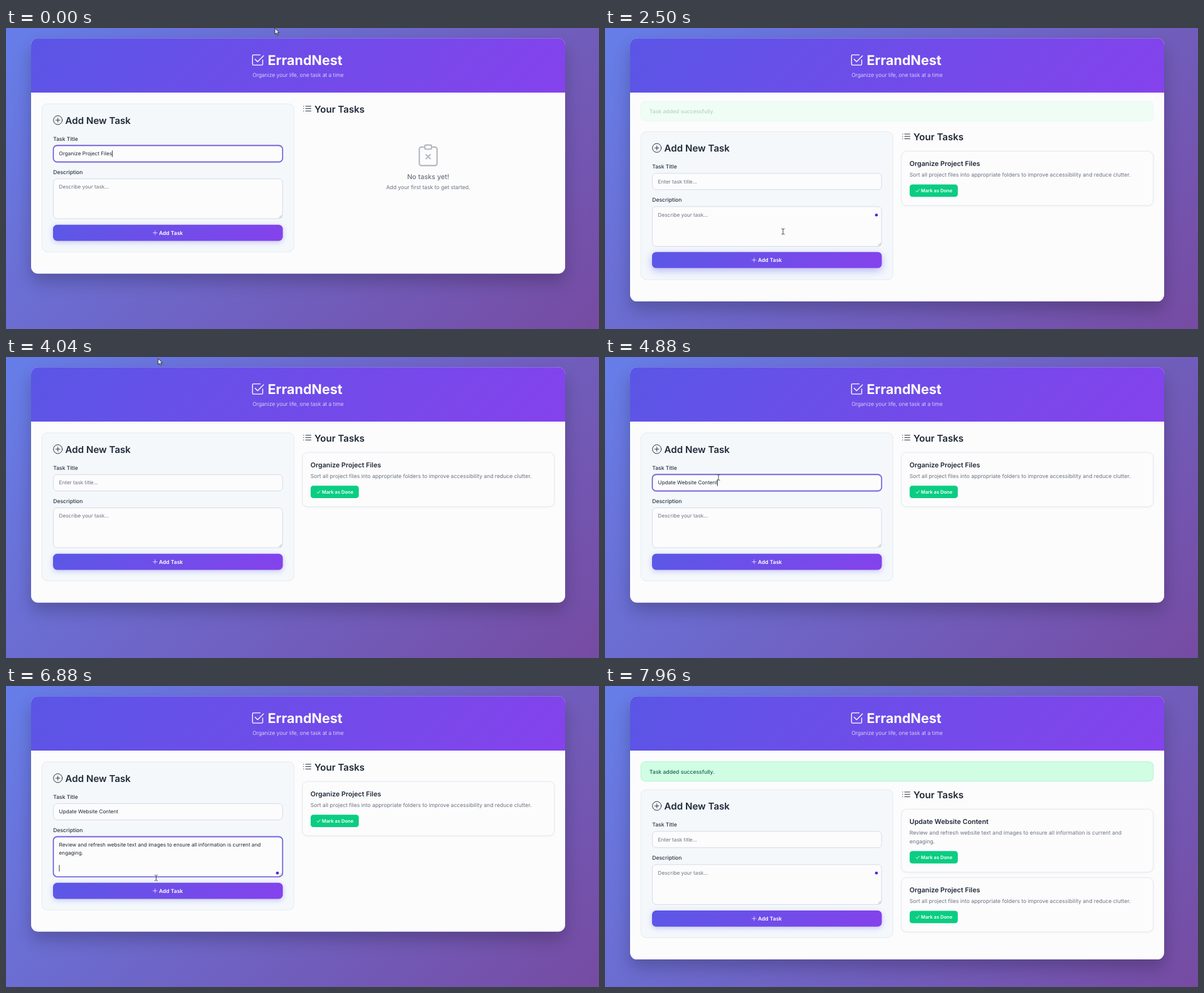
An HTML page with a canvas that plays this animation: 946x480 px, repeating every 8000 ms.

```html
<!DOCTYPE html>
<html lang="en">
<head>
<meta charset="utf-8">
<title>ErrandNest</title>
<style>
html, body { margin: 0; width: 100%; height: 100%; overflow: hidden; background: #6e64c6; }
canvas { display: block; width: 946px; height: 480px; }
</style>
</head>
<body>
<canvas id="stage" width="946" height="480"></canvas>
<script>
const ctx = document.getElementById('stage').getContext('2d');
const LOOP = 8000;
const INK = '#1f2937', MUTED = '#6b7280', PAPER = '#fcfcfd';
const BODY = 8.62, FIELD = 8.2;
const ALERT_SHIFT = 44.3;

const TASKS = [
  { title: 'Organize Project Files',
    lines: ['Sort all project files into appropriate folders to improve accessibility and reduce clutter.'] },
  { title: 'Update Website Content',
    lines: ['Review and refresh website text and images to ensure all information is current and', 'engaging.'] }
];

// Each state holds from its start time until the next one.
const STATES = [
  { at: 0, title: TASKS[0].title, focus: 'title', blink: -280, done: 0 },
  { at: 1210, title: TASKS[0].title, focus: 'desc', dot: true, done: 0 },
  { at: 1650, title: TASKS[0].title, desc: TASKS[0].lines, focus: 'desc', dot: true, done: 0 },
  { at: 2300, title: TASKS[0].title, desc: TASKS[0].lines, dot: true, done: 0 },
  { at: 2420, alert: true, dot: true, done: 1 },
  { at: 3850, done: 1 },
  { at: 4430, focus: 'title', done: 1 },
  { at: 4700, title: TASKS[1].title, focus: 'title', done: 1 },
  { at: 6120, title: TASKS[1].title, focus: 'desc', dot: true, done: 1 },
  { at: 6550, title: TASKS[1].title, desc: TASKS[1].lines, focus: 'desc', dot: true, done: 1, blink: 6550 },
  { at: 7340, title: TASKS[1].title, desc: TASKS[1].lines, dot: true, done: 1 },
  { at: 7420, alert: true, dot: true, done: 2 }
];

// time, x, y of the pointer
const PATH = [
  [0, 429, 0.5], [40, 429, 0.5], [80, 428, 5], [420, 428, 5], [1050, 145, 258], [1690, 145, 258],
  [2060, 284, 324.5], [2620, 284, 324.5], [3290, 276, 176], [3640, 290, -20], [3950, 250, -20],
  [4400, 181, 192], [4900, 181, 192], [5200, 420, 5], [5300, 420, 5], [6000, 180, 268],
  [6600, 180, 268], [6880, 239.5, 306], [7060, 245, 326], [7620, 245, 326], [7880, 250, 330]
];

const ICONS = {
  check: new Path2D('M11 2H3a1 1 0 0 0-1 1v10a1 1 0 0 0 1 1h10a1 1 0 0 0 1-1V8M5 7l3 3 7-7'),
  plusCircle: new Path2D('M15.5 8a7.5 7.5 0 1 1-15 0a7.5 7.5 0 0 1 15 0M8 4.5v7M4.5 8h7'),
  list: new Path2D('M5.5 4h9M5.5 8h9M5.5 12h9M1.8 4h.4M1.8 8h.4M1.8 12h.4'),
  clipboard: new Path2D('M4.5 2H3a1.5 1.5 0 0 0-1.5 1.5V14A1.5 1.5 0 0 0 3 15.5h10a1.5 1.5 0 0 0 1.5-1.5V3.5A1.5 1.5 0 0 0 13 2h-1.5' +
    'M6.5 .5h3a1 1 0 0 1 1 1v1a1 1 0 0 1-1 1h-3a1 1 0 0 1-1-1v-1a1 1 0 0 1 1-1M6.5 7.5l3 3M9.5 7.5l-3 3'),
  plus: new Path2D('M8 2v12M2 8h12'),
  tick: new Path2D('M2.5 8.5l3.5 4 7.5-9')
};
const ARROW = new Path2D('M0 0v9.4l2.2-2 1.5 3.4 1.6-.7-1.5-3.3h3z');
const HAND = new Path2D('M-1 5V-.5a1 1 0 0 1 2 0V3l4 .8q1 .3 1 1.4l-.6 4.8h-5L-3.4 6q.6-1.6 2.4-.3z');
const IBEAM = new Path2D('M-2.5 -4.5q2 0 2.5 1q.5-1 2.5-1M0-3.5v7M-2.5 4.5q2 0 2.5-1q.5 1 2.5 1');

const clamp = v => Math.max(0, Math.min(1, v));
const smooth = v => v * v * (3 - 2 * v);
const easeOut = v => 1 - (1 - clamp(v)) ** 2;

// Same geometry as a CSS 135deg gradient.
function diagonal(x, y, w, h, from, to) {
  const k = (w + h) / 4, cx = x + w / 2, cy = y + h / 2;
  const g = ctx.createLinearGradient(cx - k, cy - k, cx + k, cy + k);
  g.addColorStop(0, from);
  g.addColorStop(1, to);
  return g;
}

function box(x, y, w, h, r, { fill, stroke, line = 1, shadow } = {}) {
  ctx.save();
  ctx.beginPath();
  ctx.roundRect(x, y, w, h, r);
  if (shadow) [ctx.shadowOffsetY, ctx.shadowBlur, ctx.shadowColor] = shadow;
  if (fill) { ctx.fillStyle = fill; ctx.fill(); }
  ctx.shadowColor = 'transparent';
  if (stroke) { ctx.strokeStyle = stroke; ctx.lineWidth = line; ctx.stroke(); }
  ctx.restore();
}

// y is the middle of the capitals
function text(str, x, y, size, weight, color, align = 'left') {
  ctx.font = `${weight} ${size}px Inter, sans-serif`;
  ctx.textAlign = align;
  ctx.fillStyle = color;
  ctx.fillText(str, x, y + size * 0.364);
  return ctx.measureText(str).width;
}

function icon(name, x, y, size, color, line = 1) {
  ctx.save();
  ctx.translate(x, y);
  ctx.scale(size / 16, size / 16);
  ctx.strokeStyle = color;
  ctx.lineWidth = line;
  ctx.lineCap = ctx.lineJoin = 'round';
  ctx.stroke(ICONS[name]);
  ctx.restore();
}

function field(y, h, focused) {
  if (focused) box(74.3, y - 1.2, 368.2, h + 2.4, 7.5, { fill: 'rgba(99,80,230,.28)' });
  box(75.6, y + 0.5, 365.6, h - 1, 6, {
    fill: PAPER, stroke: focused ? '#6450d2' : '#d6dbe5', line: focused ? 1.4 : 1
  });
}

function caret(x, y, since, t) {
  if (Math.floor((t - since) / 530) % 2) return;
  ctx.fillStyle = INK;
  ctx.fillRect(x, y - 5.2, 0.9, 10.4);
}

function backdrop() {
  ctx.fillStyle = diagonal(0, 0, 946, 480, '#667eea', '#764ba2');
  ctx.fillRect(0, 0, 946, 480);
}

function shell(dy) {
  box(40, 16.3, 852, 375.5 + dy, 11, { fill: PAPER, shadow: [13, 27, 'rgba(0,0,0,.22)'] });
  box(40, 16.3, 852, 86.7, [11, 11, 0, 0], { fill: diagonal(40, 16, 852, 87, '#5a56e6', '#8542ec') });
  icon('check', 390.6, 40.2, 21.6, '#fff');
  text('ErrandNest', 417.5, 51.2, 21.56, 700, '#fff');
  text('Organize your life, one task at a time', 466, 75.3, BODY, 300, 'rgba(255,255,255,.92)', 'center');
}

function form(s, t, lift) {
  box(57.4, 121, 402, 236, 8.6, { fill: '#f4f8fb', stroke: '#e4eaf1' });
  icon('plusCircle', 75.2, 139.4, 15.1, INK);
  text('Add New Task', 94.6, 147.2, 15.09, 600, INK);

  text('Task Title', 75.2, 176.4, BODY, 500, '#2c3646');
  field(187, 27, s.focus === 'title');
  const w = text(s.title || 'Enter task title...', 84.6, 200.5, FIELD, 400, s.title ? INK : MUTED);
  const since = s.blink ?? s.at;
  if (s.focus === 'title') caret(84.6 + (s.title ? w : 0), 200.5, since, t);

  text('Description', 75.2, 229.4, BODY, 500, '#2c3646');
  field(240, 64.6, s.focus === 'desc');
  if (s.desc) s.desc.forEach((line, i) => text(line, 84.6, 253.4 + i * 12.4, FIELD, 400, INK));
  else if (s.focus !== 'desc') text('Describe your task...', 84.6, 253.4, FIELD, 400, MUTED);
  if (s.focus === 'desc') caret(84.6, s.desc ? 290.6 : 253.4, since, t);
  ctx.strokeStyle = '#8b9099';
  ctx.lineWidth = 0.7;
  ctx.beginPath();
  ctx.moveTo(435.5, 303); ctx.lineTo(440, 298.5);
  ctx.moveTo(438, 303); ctx.lineTo(440, 301);
  ctx.stroke();

  const y = 313.8 - lift;
  box(75, y, 366.6, 25.6, 6.5, {
    fill: diagonal(75, y, 366.6, 25.6, '#5a58e6', '#8542ec'),
    shadow: [2.2 + lift * 2, 8 + lift * 5, `rgba(79,70,229,${0.3 + lift * 0.1})`]
  });
  icon('plus', 233.5, y + 8.5, 8.6, '#fff', 1.3);
  text('Add Task', 244, y + 13, 8.5, 600, '#fff');
}

function card(task, y) {
  const extra = (task.lines.length - 1) * 13.8;
  box(472.9, y, 401.8, 86.6 + extra, 8.6, {
    fill: PAPER, stroke: '#e3e8ef', shadow: [1, 3, 'rgba(0,0,0,.05)']
  });
  text(task.title, 485.8, y + 20, 10.7, 600, INK);
  task.lines.forEach((line, i) => text(line, 485.8, y + 37.5 + i * 13.8, BODY, 400, MUTED));
  const by = y + 53 + extra;
  box(486, by, 76.8, 19.8, 4.3, { fill: '#0acd82' });
  icon('tick', 495, by + 6.4, 7.4, '#fff', 2);
  text('Mark as Done', 504, by + 10.1, 7.55, 600, '#fff');
  return y + 86.6 + extra + 8.6;
}

function list(done) {
  icon('list', 472.8, 121, 15.1, INK);
  text('Your Tasks', 492, 129.3, 15.09, 600, INK);
  if (!done) {
    icon('clipboard', 656.1, 185.6, 34.8, '#b5b8be');
    text('No tasks yet!', 673.5, 236.6, 10.78, 500, MUTED, 'center');
    text('Add your first task to get started.', 673.5, 253.9, BODY, 400, MUTED, 'center');
  }
  let y = 152.2;
  for (let i = done - 1; i >= 0; i--) y = card(TASKS[i], y);
}

function notice(age) {
  const p = easeOut(age / 500 * 0.9 + age * age / 2500000);
  ctx.save();
  ctx.globalAlpha = p;
  ctx.translate(0, -5.4 * (1 - p));
  box(57.3, 120.8, 817.4, 31, 6.5, { fill: '#d0fde3', stroke: '#b5f3d3' });
  text('Task added successfully.', 70.8, 136.5, BODY, 500, '#14694c');
  ctx.restore();
}

function pointerAt(t) {
  let i = 0;
  while (i < PATH.length - 2 && PATH[i + 1][0] <= t) i++;
  const [t0, x0, y0] = PATH[i], [t1, x1, y1] = PATH[i + 1];
  const p = smooth(clamp((t - t0) / (t1 - t0)));
  return [x0 + (x1 - x0) * p, y0 + (y1 - y0) * p];
}

function pointer(x, y, dy) {
  const py = y - dy, inside = x > 75 && x < 442;
  ctx.save();
  ctx.translate(x, y);
  ctx.lineJoin = 'round';
  if (inside && ((py > 187 && py < 214) || (py > 240 && py < 308))) {
    ctx.strokeStyle = '#333';
    ctx.lineWidth = 0.9;
    ctx.stroke(IBEAM);
  } else {
    const shape = inside && py >= 313 && py < 340 ? HAND : ARROW;
    ctx.fillStyle = '#fff';
    ctx.strokeStyle = '#222';
    ctx.lineWidth = 0.9;
    ctx.fill(shape);
    ctx.stroke(shape);
  }
  ctx.restore();
}

// Hover lift of the main button: rises under the pointer, settles after the page reloads.
function liftAt(t) {
  const hover = (from, to) => t < to ? easeOut((t - from) / 300) : 1 - smooth(clamp((t - to) / 300));
  return 1.08 * (t < 5000 ? hover(1990, 2420) : hover(6970, 7420));
}

function draw(t) {
  const s = STATES.findLast(state => state.at <= t);
  const dy = s.alert ? ALERT_SHIFT : 0;
  backdrop();
  shell(dy);
  ctx.save();
  ctx.translate(0, dy);
  form(s, t, liftAt(t));
  list(s.done);
  ctx.restore();
  if (s.alert) notice(t - s.at);
  if (s.dot) {
    ctx.fillStyle = '#5522d8';
    ctx.beginPath();
    ctx.arc(433, 298.3, 2.3, 0, Math.PI * 2);
    ctx.fill();
  }
  if (t < 7880) pointer(...pointerAt(t), dy);
}

ctx.textRendering = 'geometricPrecision';
const start = performance.now();
function tick() {
  draw((performance.now() - start) % LOOP);
  requestAnimationFrame(tick);
}
tick();
</script>
</body>
</html>
```
